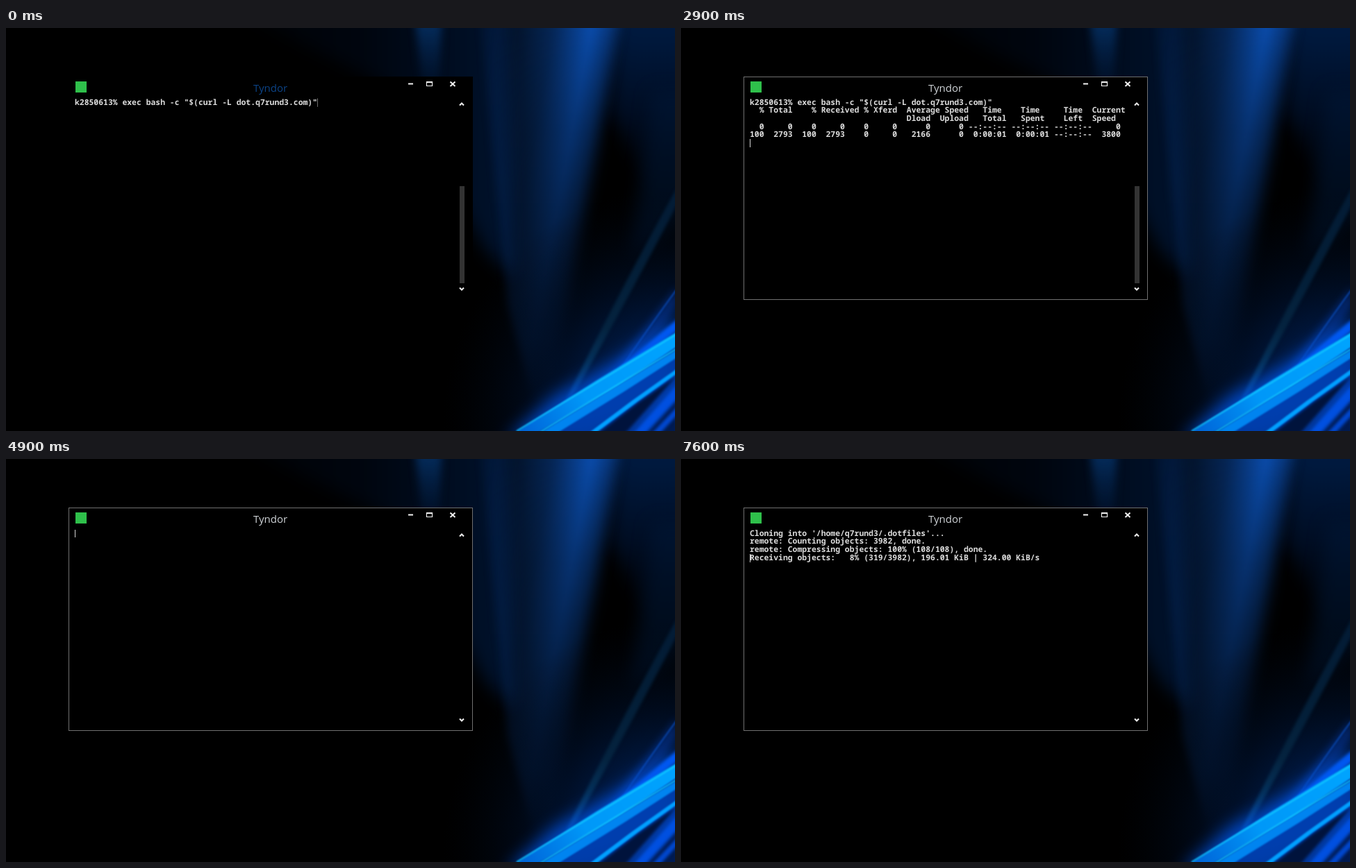
An HTML page for the animation above (8000 ms loop, 963 px wide and 581 px high).

```html
<!DOCTYPE html>
<html lang="en">
<head>
<meta charset="utf-8">
<title>Terminal session</title>
<style>
  html, body { margin: 0; width: 100%; height: 100%; overflow: hidden; background: #000; }
  svg { display: block; width: 963px; height: 581px; }
  .b1 { filter: blur(1px); }
  .b2 { filter: blur(2px); }
  .b6 { filter: blur(6px); }
  .b12 { filter: blur(12px); }
  #rows text {
    font: 600 11.41px "Noto Sans Mono", "DejaVu Sans Mono", monospace;
    fill: #dcdcdc; white-space: pre; text-rendering: geometricPrecision;
  }
  #title { font: 15px "Open Sans", "Noto Sans", sans-serif; text-anchor: middle; }
</style>
</head>
<body>
<svg viewBox="0 0 963 581" xmlns="http://www.w3.org/2000/svg">
  <defs>
    <linearGradient id="haze" gradientUnits="userSpaceOnUse" x1="300" y1="0" x2="720" y2="0">
      <stop offset="0" stop-color="#000814" stop-opacity="0"/>
      <stop offset=".5" stop-color="#00050e"/>
      <stop offset="1" stop-color="#00122c"/>
    </linearGradient>
    <linearGradient id="beam" gradientUnits="userSpaceOnUse" x1="693" y1="-37" x2="890" y2="0">
      <stop offset="0" stop-color="#0a4cac" stop-opacity=".08"/>
      <stop offset=".25" stop-color="#0a4cac" stop-opacity=".26"/>
      <stop offset=".5" stop-color="#0a4cac" stop-opacity=".5"/>
      <stop offset=".77" stop-color="#0a4cac"/>
      <stop offset=".9" stop-color="#0a4cac" stop-opacity=".7"/>
      <stop offset="1" stop-color="#0a4cac" stop-opacity=".1"/>
    </linearGradient>
    <linearGradient id="fall" gradientUnits="userSpaceOnUse" x1="0" y1="0" x2="0" y2="560">
      <stop offset="0" stop-color="#fff"/>
      <stop offset=".27" stop-color="#fff" stop-opacity=".66"/>
      <stop offset=".54" stop-color="#fff" stop-opacity=".42"/>
      <stop offset=".8" stop-color="#fff" stop-opacity=".24"/>
      <stop offset="1" stop-color="#fff" stop-opacity="0"/>
    </linearGradient>
    <mask id="fade" maskUnits="userSpaceOnUse" x="0" y="0" width="963" height="581">
      <rect width="963" height="581" fill="url(#fall)"/>
    </mask>
    <linearGradient id="ray" gradientUnits="userSpaceOnUse" x1="0" y1="0" x2="0" y2="110">
      <stop offset="0" stop-color="#042a58"/>
      <stop offset="1" stop-color="#021a3c" stop-opacity="0"/>
    </linearGradient>
    <linearGradient id="side" gradientUnits="userSpaceOnUse" x1="0" y1="0" x2="0" y2="260">
      <stop offset="0" stop-color="#001a40"/>
      <stop offset=".5" stop-color="#000c20"/>
      <stop offset="1" stop-color="#000610" stop-opacity="0"/>
    </linearGradient>
    <radialGradient id="glow" gradientUnits="userSpaceOnUse" cx="960" cy="560" r="330">
      <stop offset="0" stop-color="#00389c"/>
      <stop offset=".3" stop-color="#002460" stop-opacity=".8"/>
      <stop offset=".6" stop-color="#001230" stop-opacity=".6"/>
      <stop offset="1" stop-color="#000814" stop-opacity="0"/>
    </radialGradient>
    <linearGradient id="streak" gradientUnits="userSpaceOnUse" x1="740" y1="581" x2="963" y2="440">
      <stop offset="0" stop-color="#0064d8"/>
      <stop offset=".4" stop-color="#0098f8"/>
      <stop offset="1" stop-color="#00a4ff"/>
    </linearGradient>
    <linearGradient id="arc" gradientUnits="userSpaceOnUse" x1="963" y1="235" x2="795" y2="560">
      <stop offset="0" stop-color="#04203c"/>
      <stop offset=".6" stop-color="#052844"/>
      <stop offset="1" stop-color="#0a5090"/>
    </linearGradient>
  </defs>

  <g id="wallpaper">
    <rect width="963" height="581" fill="#000"/>
    <path class="b12" d="M300-40H720L730 360 690 320 560 90Z" fill="url(#haze)"/>
    <path class="b12" d="M880-40H990V260H940L870 120Z" fill="url(#side)"/>
    <g mask="url(#fade)">
      <path class="b6" d="M680-40H894L860 190 802 490 765 560 722 400Z" fill="url(#beam)"/>
    </g>
    <path class="b6" d="M588-20H628L622 110H602Z" fill="url(#ray)"/>
    <path class="b12" d="M930 90H990V260L900 330Z" fill="#001838" opacity=".5"/>

    <rect x="630" y="230" width="333" height="351" fill="url(#glow)"/>
    <path class="b2" d="M966 230Q888 370 796 556L802 556Q898 386 966 254Z" fill="url(#arc)" opacity=".8"/>
    <path class="b6" d="M966 374Q890 470 830 550L860 550 966 400Z" fill="#0838a0" opacity=".55"/>
    <path class="b1" d="M966 376Q905 460 862 525" fill="none" stroke="#0844a8" stroke-width="2"/>
    <path class="b12" d="M966 420 880 480 790 530 720 595 840 590 966 520Z" fill="#0058f0" opacity=".75"/>
    <path class="b2" d="M966 420 880 492 905 482 966 436Z" fill="#0058f0"/>
    <path class="b2" d="M966 460 770 586H963V480Z" fill="#003ca8" opacity=".8"/>
    <path class="b1" d="M966 438 850 508 728 586H760L880 516 966 459Z" fill="url(#streak)"/>
    <path class="b1" d="M966 464 870 522 766 586H790L890 524 966 475Z" fill="#0084f0"/>
    <path class="b1" d="M966 441 735 581M966 462 768 583" fill="none" stroke="#10c8ff" stroke-width="2"/>
    <path class="b2" d="M966 501 890 586H850L910 540Z" fill="#00133c"/>
    <path class="b1" d="M966 491 900 538 836 586H846L910 538 966 498Z" fill="#00a0ff"/>
    <path class="b2" d="M966 514 902 586H918L966 534Z" fill="#0050e0"/>
    <path class="b2" d="M966 538 922 586H966Z" fill="#001a50"/>
    <path class="b2" d="M966 546 928 586H940L966 558Z" fill="#0048d0"/>
  </g>

  <g id="window">
    <rect x="90" y="70" width="582" height="322" fill="#000"/>
    <rect id="frame" x="90.5" y="70.5" width="581" height="321" fill="none" stroke="#707070"/>
    <rect x="100" y="77" width="16" height="16" fill="#2fc04b"/>
    <text id="title" x="380.5" y="92">Tyndor</text>
    <g fill="none" stroke="#f2f2f2">
      <path d="M579 80.5H586" stroke-width="2"/>
      <path d="M605.5 77V83.5H613.5V77" stroke-width="1.2"/>
      <path d="M605 78H614" stroke-width="2"/>
      <path d="M639.5 77.5 646.5 84M646.5 77.5 639.5 84" stroke-width="2"/>
      <path d="M653 111.5 656 108.5 659 111.5M653 374.5 656 377.5 659 374.5" stroke-width="2"/>
    </g>
    <rect id="thumb" x="653" width="7" fill="#333"/>
    <g id="rows" xml:space="preserve"></g>
    <path id="cursor" stroke="#d6d6d6"/>
  </g>
</svg>

<script>
const LOOP = 8000, LEFT = 99, TOP = 101.6, CELL = 6.846, PITCH = 11.74, ROWS = 6;
const $ = id => document.getElementById(id);

const command = 'k2850613% exec bash -c "$(curl -L dot.q7rund3.com)"';
const zeros = '  0     0    0     0    0     0      0      0 --:--:-- --:--:-- --:--:--     0';
const totals = '100  2793  100  2793    0     0   2166      0  0:00:01  0:00:01 --:--:--  3800';
const fetching = [
  command,
  '  % Total    % Received % Xferd  Average Speed   Time    Time     Time  Current',
  '                                 Dload  Upload   Total   Spent    Left  Speed',
  zeros
];
const ask = (answer = '') => [
  'If the file exists, it will be ruthlessly clobbered',
  'Are you sure you want to continue (yes/no)? ' + answer
];
const cloning = ["Cloning into '/home/q7rund3/.dotfiles'..."];
const counted = [...cloning, 'remote: Counting objects: 3982, done.'];
const receiving = (percent, rate = '') => [
  ...counted,
  'remote: Compressing objects: 100% (108/108), done.',
  `Receiving objects:   ${percent}% (${Math.ceil(percent * 39.82)}/3982)${rate}`
];

// [start ms, lines, cursor row, cursor column]; no row means a hidden cursor
const steps = [
  [0, [command], 0, 51],
  [1700, [command], 1, 0],
  [1900, fetching, 3, 78],
  [2200, fetching, 4, 0],
  [2300, [...fetching, zeros], 4, 78],
  [2800, [...fetching, totals], 4, 78],
  [2900, [...fetching, totals], 5, 0],
  [3100, ask(), 1, 44],
  [3600, ask()],
  [4100, ask('y'), 1, 45],
  [4200, ask('ye'), 1, 46],
  [4300, ask('yes'), 1, 47],
  [4600, ask('yes'), 2, 0],
  [4700, ask('yes'), 6, 0],
  [4900, [], 0, 0],
  [5400, []],
  [5900, cloning, 1, 0],
  [6400, cloning],
  [6800, [...counted, 'remote: Compressing objects:  18% (20/108)'], 2, 0],
  [7000, receiving(3), 3, 0],
  [7200, receiving(6), 3, 0],
  [7600, receiving(8, ', 196.01 KiB | 324.00 KiB/s'), 3, 0]
];

const rows = Array.from({ length: ROWS }, (_, i) => {
  const row = document.createElementNS('http://www.w3.org/2000/svg', 'text');
  row.setAttribute('x', LEFT);
  row.setAttribute('y', TOP + i * PITCH + 8.9);
  return $('rows').appendChild(row);
});

function set(id, attrs) {
  for (const name in attrs) $(id).setAttribute(name, attrs[name]);
}

function drawCursor(row, col, focused) {
  if (row === undefined) return set('cursor', { d: '' });
  const x = Math.round(LEFT + col * CELL) + 0.5;
  const top = Math.round(TOP + row * PITCH);
  const bottom = Math.round(TOP + (row + 1) * PITCH);
  set('cursor', { d: `M${x} ${top}V${bottom}`, 'stroke-dasharray': focused ? 'none' : '1 1' });
}

function draw(t) {
  const [, lines, row, col] = steps.findLast(step => step[0] <= t);
  const focused = t >= 1300;
  const thumbTop = t < 3100 ? 228 : t < 4900 ? 160 : 368;
  rows.forEach((text, i) => {
    const line = lines[i] || '';
    if (text.textContent !== line) text.textContent = line;
  });
  drawCursor(row, col, focused);
  set('frame', { visibility: focused ? 'visible' : 'hidden' });
  set('title', { fill: focused ? '#d0d4d8' : '#0c4488' });
  set('thumb', { y: thumbTop, height: 368 - thumbTop });
}

const start = performance.now();
function tick() {
  draw((performance.now() - start) % LOOP);
  requestAnimationFrame(tick);
}
tick();
</script>
</body>
</html>
```
